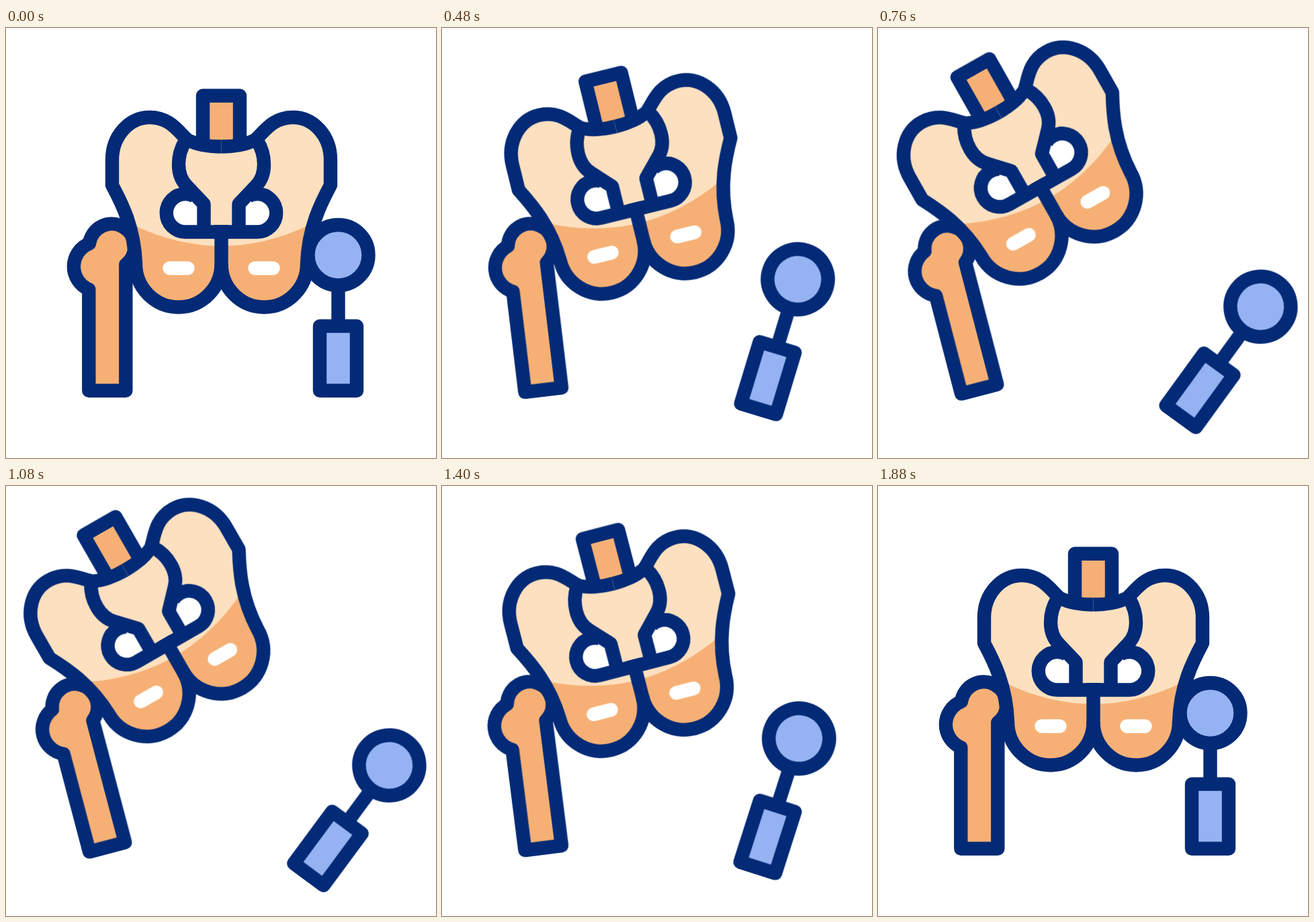
Recreate the animation shown at these times as an HTML page. Size 640 px wide and 640 px high, loop 2.4 s.

```html
<!DOCTYPE html>
<html lang="en">
<head>
<meta charset="utf-8">
<title>Hip joint icon</title>
<style>
  html, body { margin: 0; width: 100%; height: 100%; overflow: hidden; background: #fff; }
  svg { display: block; width: 100vw; height: 100vh; }

  .line { stroke: #032a76; stroke-width: 20.4; stroke-linejoin: round; fill: none; }
  .bone { fill: #f6b075; }
  .pale { fill: #fde0bf; }
  .metal { fill: #95b2f3; }
  .hole { fill: #fff; }
  .shine { stroke: #fff; stroke-width: 20.4; stroke-linecap: round; }

  .part {
    transform-origin: var(--pivot);
    animation: swing 2400ms linear infinite;
  }
  #pelvis  { --pivot: 160px 328px;   --move: -47.4px, 8.8px; --turn: -30.3deg; }
  #femur   { --pivot: 142px 539px;   --move: 0px, 0px;       --turn: -15deg; }
  #implant { --pivot: 494.5px 338px; --move: 77px, 79px;     --turn: 37deg; }

  /* The return is the outward swing mirrored in time, then a rest. */
  @keyframes swing {
    0% {
      transform: translate(0px, 0px) rotate(0deg);
      animation-timing-function: cubic-bezier(.83, 0, .22, 1);
    }
    39.3% {
      transform: translate(var(--move)) rotate(var(--turn));
      animation-timing-function: cubic-bezier(.78, 0, .17, 1);
    }
    78.6%, 100% { transform: translate(0px, 0px) rotate(0deg); }
  }
</style>
</head>
<body>
<svg viewBox="0 0 640 640">
  <defs>
    <path id="side" d="M320.5 176.5C301 176.5 283 173 271 167C258 157 246 133 214 133
      C183 133 158 161 158 196V234C172 260 191 297 193 351A63.75 64.5 0 0 0 320.5 351"/>
    <g id="fills">
      <use href="#side" class="pale"/>
      <path class="bone" d="M189 293Q255 324.5 320.5 324.5V351A63.75 64.5 0 0 1 193 351Z"/>
      <path class="hole" d="M294.5 303.5H267A28.25 28.25 0 0 1 267 247H281L294.5 262Z"/>
      <path class="shine" d="M243.5 357.5H270.5"/>
    </g>
    <g id="lines" class="line">
      <use href="#side"/>
      <path d="M267 168Q257 184 257 203C257 218 262 228 269 235L294.5 262V303.5"/>
      <path d="M320.5 303.5H267A28.25 28.25 0 0 1 267 247Q275 247 281 251"/>
    </g>
  </defs>

  <g id="femur" class="part">
    <path class="line bone" style="fill:#f6b075" d="M123.3 539.7V389A37 37 0 0 1 124 320.7
      A33.8 33.8 0 1 1 178.3 352V539.7Z"/>
  </g>

  <g id="implant" class="part">
    <path class="line" d="M494.5 383V444"/>
    <circle class="line" style="fill:#95b2f3" cx="494.5" cy="338" r="45"/>
    <rect class="line" style="fill:#95b2f3" x="467" y="443.6" width="55" height="96.1"/>
  </g>

  <g id="pelvis" class="part">
    <path class="line" style="fill:#f6b075" d="M293 172V100.7H348V172"/>
    <use href="#fills"/>
    <use href="#fills" transform="translate(641) scale(-1 1)"/>
    <path class="pale" d="M312 180H329V300H312Z"/>
    <use href="#lines"/>
    <use href="#lines" transform="translate(641) scale(-1 1)"/>
    <path class="line" d="M320.5 293V352"/>
  </g>
</svg>
</body>
</html>
```
